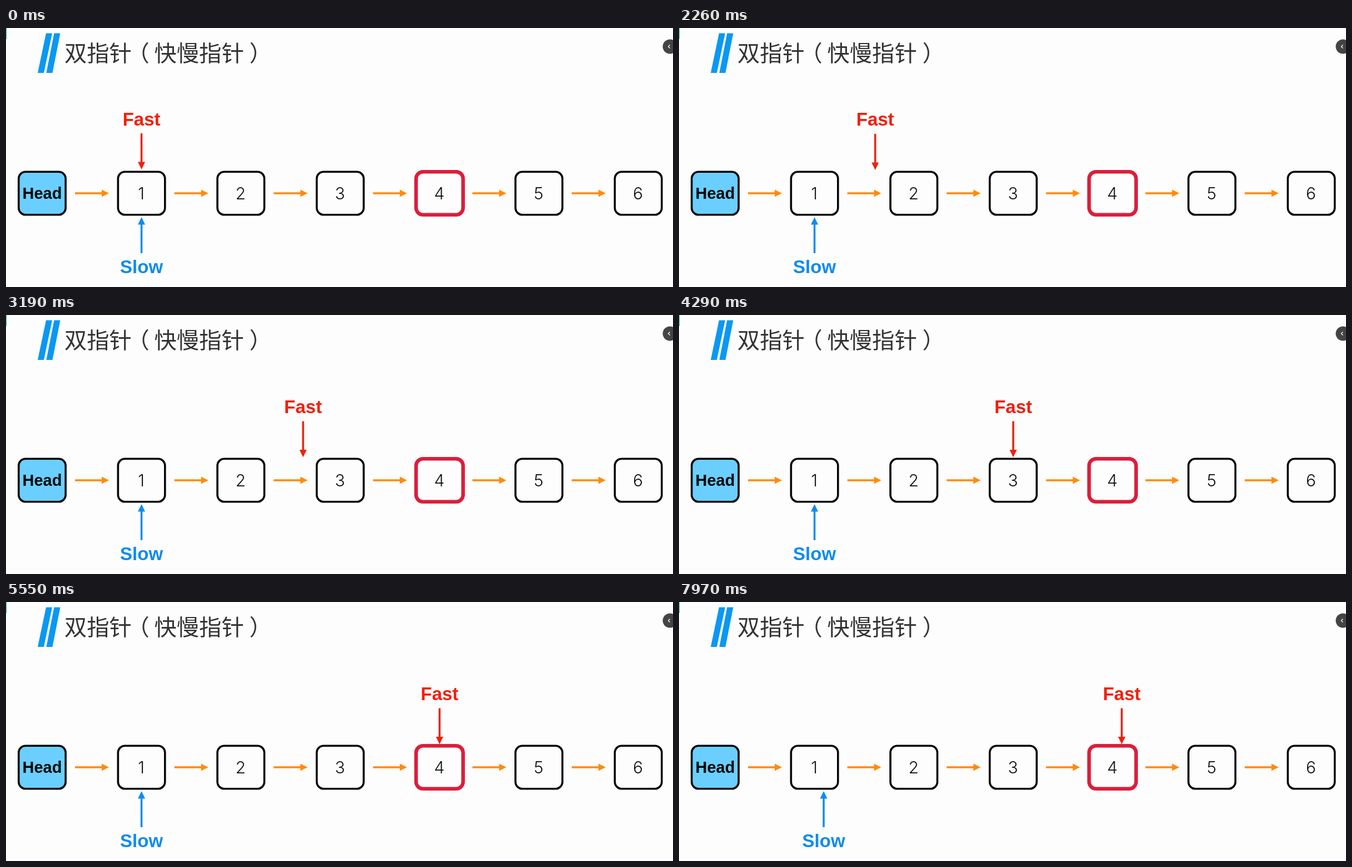
An HTML page for the animation above (8 s loop, 1199 px wide and 467 px high).

```html
<!DOCTYPE html>
<html lang="zh-CN">
<head>
<meta charset="utf-8">
<title>双指针</title>
<style>
html, body { margin: 0; width: 100%; height: 100%; overflow: hidden; background: #fdfdfd; }
svg { display: block; width: 100%; height: 100%; }
text { text-anchor: middle; }
.title { font: 300 40.3px "Noto Sans CJK SC", "Noto Sans CJK", sans-serif; text-anchor: start; fill: #333; }
.num { font: 300 30px Inter, sans-serif; fill: #111; }
.label { font: bold 33px "Liberation Sans", Arial, sans-serif; }
.head { font: bold 29px "Liberation Sans", Arial, sans-serif; fill: #050505; }
</style>
</head>
<body>
<svg id="stage" viewBox="0 0 1199 467">
  <rect width="1199" height="467" fill="#fdfdfd"/>
  <rect width="1.3" height="20" fill="#2fd080"/>
  <path d="M72 9.5H83L68 81H57ZM86.500 9.500H97.500L83.500 81H72.500Z" fill="#0a98f3"/>
  <text class="title" y="60" x="105 145.300 185.600 217.500 266.500 306.800 347.100 387.400 437.500">双指针（快慢指针）</text>
  <circle cx="1193.500" cy="33.500" r="13" fill="#444"/>
  <path d="M1193.500 30.500L1190.500 33.500L1193.500 36.500" fill="none" stroke="#fff" stroke-width="1.300"/>
  <g id="list"></g>
  <g id="fast" fill="#f0200c" stroke="#f0200c">
    <text class="label" y="175.500" stroke="none">Fast</text>
    <path d="M0 190V244" stroke-width="3.500"/>
    <path d="M-6.500 241.500H6.500L0 255Z" stroke="none"/>
  </g>
  <g id="slow" fill="#0d8bf2" stroke="#0d8bf2">
    <text class="label" y="442" stroke="none">Slow</text>
    <path d="M0 406V352" stroke-width="3.500"/>
    <path d="M-6.500 354.500H6.500L0 341Z" stroke="none"/>
  </g>
</svg>
<script>
const LOOP = 8000, GAP = 178.6, FIRST = 65, MOVE = 340, STEP = 40;
const MID = 298;

// Start of each hop, first visible step, and which pointers take part
const hops = [
  { start: 2070, tick: 2100 },
  { start: 2997, tick: 3030 },
  { start: 4315, tick: 4330 },
  { start: 7897, tick: 7930, both: true }
];

const nodeX = i => FIRST + i * GAP;

function node(i) {
  const x = nodeX(i), hot = i === 4;
  const w = hot ? 84.5 : 84.4, h = hot ? 77.5 : 77.6;
  const text = i ? `<text class="num" x="${x - 0.5}" y="309">${i}</text>`
                 : `<text class="head" x="${x}" y="308">Head</text>`;
  const arrow = i < 6
    ? `<g transform="translate(${x + 59} ${MID})" fill="#ff8a0c">
         <rect y="-1.750" width="50" height="3.500"/><path d="M48 -6.500V6.500L61 0Z"/></g>`
    : "";
  return `<rect x="${x - w / 2}" y="${MID - h / 2}" width="${w}" height="${h}" rx="12.500"
    fill="${i ? "#fdfdfd" : "#6acfff"}" stroke="${hot ? "#dc1e3c" : "#050505"}"
    stroke-width="${hot ? 6.5 : 3.6}"/>${text}${arrow}`;
}

const ease = p => p < 0.5 ? 2 * p * p : 1 - 2 * (1 - p) ** 2;

function progress({ start, tick }, t) {
  if (t < tick) return 0;
  const shown = tick + Math.floor((t - tick) / STEP) * STEP;
  return ease(Math.min(1, (shown - start) / MOVE));
}

const $ = id => document.getElementById(id);
$("list").innerHTML = Array.from({ length: 7 }, (_, i) => node(i)).join("");

function draw(t) {
  const done = hops.map(h => progress(h, t));
  const fast = done.reduce((a, b) => a + b, 0);
  const slow = hops.reduce((a, h, i) => a + (h.both ? done[i] : 0), 0);
  $("fast").setAttribute("transform", `translate(${nodeX(1 + fast)} ${done[0] * 1.5})`);
  $("slow").setAttribute("transform", `translate(${nodeX(1 + slow)} 0)`);
}

const begin = performance.now();
function frame(now) {
  draw(Math.max(0, now - begin) % LOOP);
  requestAnimationFrame(frame);
}
draw(0);
requestAnimationFrame(frame);
</script>
</body>
</html>
```
